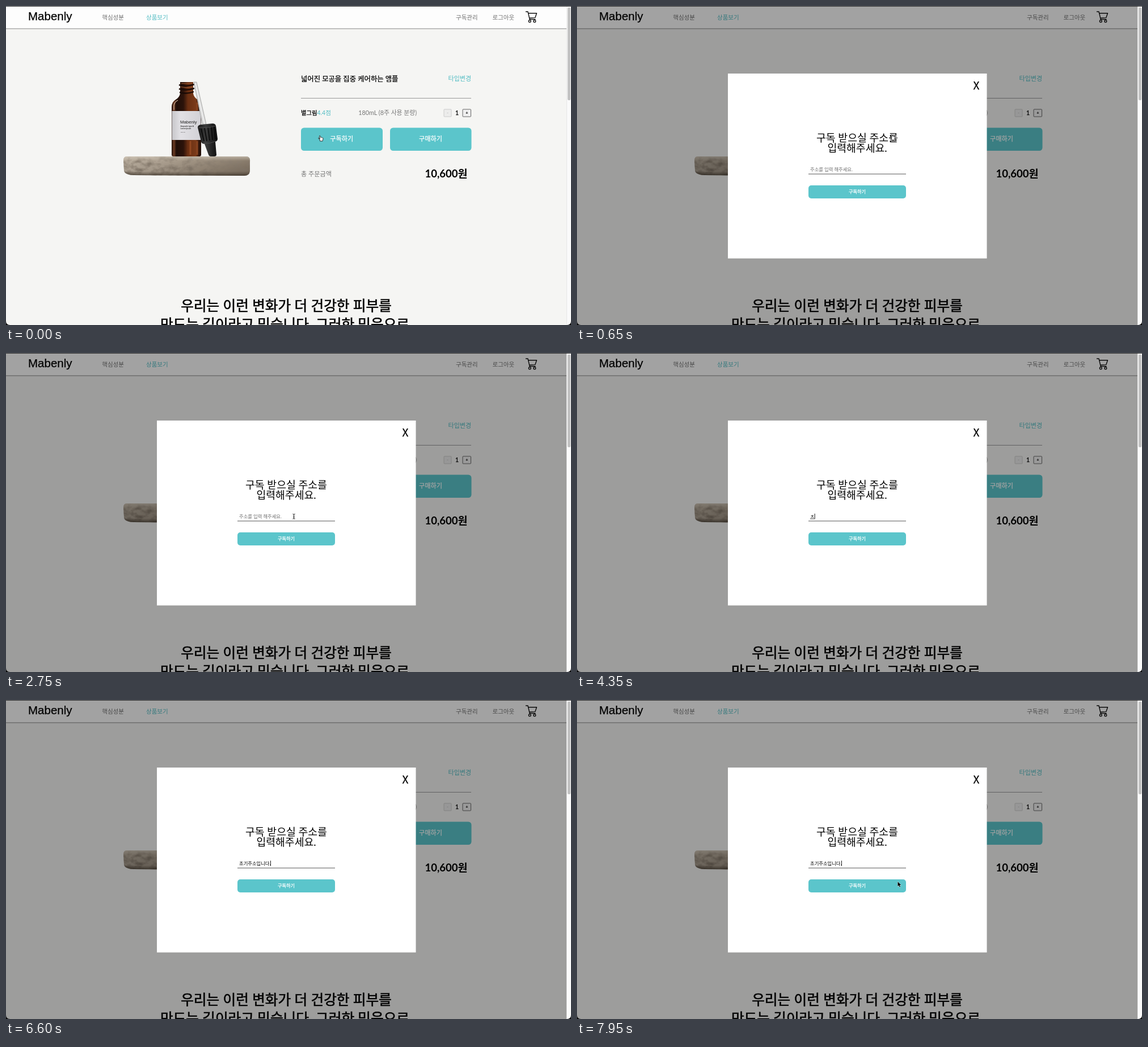
An HTML page for the animation above (8000 ms loop, 996x562 px).

```html
<!DOCTYPE html>
<html lang="ko">
<head>
<meta charset="utf-8">
<title>구독하기</title>
<style>
  html, body { margin: 0; width: 100%; height: 100%; overflow: hidden; background: #f5f5f3; }
  svg { display: block; width: 100vw; height: 100vh; }
  text { font-family: Lato, "Noto Sans CJK KR", "Noto Sans CJK", sans-serif; white-space: pre; }
  .logo { font-family: "Liberation Sans", Arial, sans-serif; }
  .close { font: 19px "Noto Sans CJK KR", "Noto Sans CJK", sans-serif; }
  .mid { text-anchor: middle; }
  .end { text-anchor: end; }
  .medium { stroke: currentColor; stroke-width: .25px; }
  .nav { font-size: 10.5px; fill: #707070; }
  .teal { fill: #51bcc3; }
  .white { fill: #fff; color: #fff; }
  .grey { fill: #777; }
  .headline { font-size: 24.65px; stroke: #000; stroke-width: .6px; }
  .title { font-size: 18.3px; }
  .field { font-size: 8.3px; }
</style>
</head>
<body>
<svg viewBox="0 0 996 562" preserveAspectRatio="none">
  <defs>
    <linearGradient id="glass">
      <stop offset="0" stop-color="#24120b"/><stop offset=".08" stop-color="#6b3a22"/>
      <stop offset=".16" stop-color="#1f0e08"/><stop offset=".4" stop-color="#2c130a"/>
      <stop offset=".55" stop-color="#6a2f12"/><stop offset=".82" stop-color="#7a3a19"/>
      <stop offset=".92" stop-color="#32160b"/><stop offset="1" stop-color="#1f0e08"/>
    </linearGradient>
    <linearGradient id="label">
      <stop offset="0" stop-color="#c6c5c9"/><stop offset=".3" stop-color="#e2e1e5"/>
      <stop offset="1" stop-color="#d2d1d6"/>
    </linearGradient>
    <linearGradient id="cap">
      <stop offset="0" stop-color="#171717"/><stop offset=".4" stop-color="#3b3b3b"/>
      <stop offset="1" stop-color="#0d0d0d"/>
    </linearGradient>
    <linearGradient id="stone">
      <stop offset="0" stop-color="#b5aa9b"/><stop offset=".25" stop-color="#ab9f90"/>
      <stop offset=".6" stop-color="#958878"/><stop offset="1" stop-color="#7c6f60"/>
    </linearGradient>
    <linearGradient id="stoneShade" x2="0" y2="1">
      <stop offset="0" stop-color="#e0d8ca" stop-opacity=".7"/><stop offset=".25" stop-color="#c8bba8" stop-opacity=".15"/>
      <stop offset=".75" stop-color="#4c4135" stop-opacity=".1"/><stop offset="1" stop-color="#2b231a" stop-opacity=".8"/>
    </linearGradient>
    <filter id="grain" x="0" y="0" width="1" height="1">
      <feTurbulence type="fractalNoise" baseFrequency=".07 .11" numOctaves="4" seed="4"/>
      <feColorMatrix values="0 0 0 0 .22  0 0 0 0 .18  0 0 0 0 .14  2.6 0 0 0 -1.05"/>
    </filter>
    <clipPath id="stoneClip"><path d="M213 265H424Q431 266 430 274V291Q429 299 420 299L225 298Q209 297 208 290L207 272Q207 265 213 265Z"/></clipPath>
  </defs>

  <rect width="996" height="562" fill="#f5f5f3"/>
  <rect width="988" height="40" fill="#fdfdfd"/>
  <path d="M0 40H988" stroke="#858585"/>

  <text class="logo" x="39" y="25.3" font-size="20.5" stroke="#000" stroke-width=".25">Mabenly</text>
  <text class="nav" x="169.3" y="23.7">핵심성분</text>
  <text class="nav teal" x="247" y="23.7">상품보기</text>
  <text class="nav" x="793" y="23.7">구독관리</text>
  <text class="nav" x="857.5" y="23.7">로그아웃</text>
  <g fill="none" stroke="#111" stroke-width="1.4" stroke-linejoin="round" stroke-linecap="round">
    <path d="M916.5 10H920L923.2 23.5H933M920.8 12.8H935.5L932.8 20.6L922.6 21.2"/>
    <circle cx="923.3" cy="26.7" r="1.9"/><circle cx="931.8" cy="26.7" r="1.9"/>
  </g>

  <g id="bottle">
    <path d="M307 134H330V154Q331 161 338 165Q344 169 344 178V262Q344 265 341 265H295Q292 265 292 262V178Q292 169 299 165Q306 161 307 154Z" fill="url(#glass)"/>
    <path d="M305 139Q318 143 332 138M305 146Q318 150 332 145M306 152Q318 156 331 151" fill="none" stroke="#1b0b06" stroke-width="2.4"/>
    <path d="M309 136.5H328M308 142.5Q318 145 329 142.5" fill="none" stroke="#a2623b" stroke-width=".9"/>
    <path d="M296 183V175Q297 169 303 166" fill="none" stroke="#d9b9a0" stroke-width="1.2"/>
    <path d="M325 238V262M337 170V184M337 238V262" stroke="#a9562a" stroke-width="3" opacity=".6"/>
    <rect x="292.5" y="185" width="51" height="51" fill="url(#label)"/>
    <text class="logo" x="307" y="207" font-size="7.8" fill="#222">Mabenly</text>
    <g font-size="3.3" fill="#333">
      <text x="307.5" y="213.3" font-weight="700">Ampoule type A</text>
      <text x="307.5" y="217.3" font-weight="700">Lorem ipsum</text>
      <text x="307.5" y="222.8" font-size="2.6">180 mL</text>
    </g>
    <path d="M331 134H336L353 208H346Z" fill="#d9d9d8" stroke="#9b9b9a" stroke-width=".7"/>
    <path d="M334 136L350 208" stroke="#f8f8f8" stroke-width="1.2"/>
    <path d="M338 214Q338 210 343 209L364 207Q369 207 370 211L373 234Q373 238 369 239L371 262Q371 265 367 265H361Q358 265 357 262L350 243Q345 243 344 239Z" fill="url(#cap)"/>
    <path d="M344 216L349 238M350 215L354 238M356 214L359 237M362 213L364 236M367 213L369 235" stroke="#080808" stroke-width="1.6"/>
    <path d="M339 214Q355 216 370 211M348 242Q360 243 370 238" fill="none" stroke="#555" stroke-width=".8"/>
  </g>
  <g clip-path="url(#stoneClip)">
    <rect x="207" y="264" width="224" height="36" fill="url(#stone)"/>
    <rect x="207" y="264" width="224" height="36" filter="url(#grain)"/>
    <rect x="207" y="264" width="224" height="36" fill="url(#stoneShade)"/>
  </g>

  <text class="medium" x="520" y="132.9" font-size="12.33">넓어진 모공을 집중 케어하는 앰플</text>
  <text class="teal end" x="820" y="132" font-size="11">타입변경</text>
  <path d="M520 162.5H820" stroke="#999"/>
  <text class="medium" x="520" y="191.6" font-size="10.35">별그림</text>
  <text class="teal" x="548.5" y="191.6" font-size="10.5">4.4점</text>
  <text class="grey" x="621.3" y="191.6" font-size="10.8">180mL (8주 사용 분량)</text>
  <rect x="772" y="182" width="13" height="13" rx="1" fill="#ececeb" stroke="#cbcbcb"/>
  <text class="mid" x="778.5" y="191.3" font-size="8" fill="#aaa">-</text>
  <text class="mid medium" x="795" y="192" font-size="10.5">1</text>
  <rect x="805" y="182" width="14.5" height="13" rx="1" fill="#efefef" stroke="#666"/>
  <text class="mid" x="812.3" y="191.3" font-size="8" font-weight="700">+</text>
  <g fill="#5bc5cb">
    <rect x="520" y="214.5" width="144" height="40.5" rx="5.5"/>
    <rect x="677" y="214.5" width="143.5" height="40.5" rx="5.5"/>
  </g>
  <text class="mid white medium" x="591.7" y="238.2" font-size="11.1">구독하기</text>
  <text class="mid white medium" x="748.5" y="238.2" font-size="11.1">구매하기</text>
  <text class="grey" x="520" y="300" font-size="11.1">총 주문금액</text>
  <text class="end" x="813.5" y="302.2" font-size="18.5" font-weight="700">10,600원</text>

  <text class="headline mid" x="494" y="536.8">우리는 이런 변화가 더 건강한 피부를</text>
  <text class="headline mid" x="491.5" y="569.5">만드는 길이라고 믿습니다. 그러한 믿음으로</text>

  <g id="modal">
    <rect y="1" width="988" height="561" opacity=".36"/>
    <rect x="266" y="119" width="456.5" height="325.7" fill="#fff"/>
    <text class="close mid medium" x="704" y="146.5">X</text>
    <text class="title mid" x="494" y="238.6">구독 받으실 주소를</text>
    <text class="title mid" x="494" y="256.8">입력해주세요.</text>
    <text class="field" id="placeholder" x="411" y="290.9" fill="#6f6f6f">주소를 입력 해주세요.</text>
    <text class="field" id="typed" x="411" y="290.6"></text>
    <path id="composing" stroke="#000" stroke-width=".8"/>
    <path id="caret" stroke="#000" stroke-width=".9"/>
    <path d="M408 296H580" stroke="#555"/>
    <rect x="408" y="316" width="172" height="23" rx="5" fill="#5bc5cb"/>
    <text class="mid white medium" x="494" y="330.1" font-size="8.2">구독하기</text>
  </g>

  <rect x="988" width="8" height="562" fill="#fafafa"/>
  <path d="M988.5 0V562" stroke="#e6e6e6"/>
  <rect x="990" y="2.5" width="5.2" height="163.5" rx="2.6" fill="#c2c2c2"/>
  <path d="M0 .5H996" stroke="#333"/>
  <path d="M0 555Q0 562 7 562H0ZM996 555Q996 562 989 562H996Z"/>

  <g id="hand"><path d="M-1.6 1.2L-2.6-3.6Q-2.5-5-1.4-4.5L-.3-1.4Q.8-2.2 1.4-1.2Q2.5-1.8 2.9-.7Q4.1-.8 4 .7L3.4 3.4L3 5H-1.4Q-2-.1-4 .6Q-4.8-.6-3.6-.8Z" fill="#fff" stroke="#222" stroke-width=".9" stroke-linejoin="round"/></g>
  <g id="beam"><path d="M-2-4.3Q0-4.3 0-3.4Q0-4.3 2-4.3M0-3.4V3.4M-2 4.3Q0 4.3 0 3.4Q0 4.3 2 4.3M-1 .9H1" fill="none" stroke="#111"/></g>
  <g id="arrow"><path d="M0 0V8L1.9 6.3L3.1 9.2L4.5 8.6L3.3 5.8H5.7Z" stroke="#fff" stroke-width=".8" paint-order="stroke"/></g>
</svg>
<script>
const $ = id => document.getElementById(id);
const LOOP = 8000, FIELD_X = 411, ADVANCE = 8.3 * .92;

// Hangul syllables as the input method composes them.
const typing = [
  [4350, 'ㅊ'], [4650, '초'], [4950, '촉'], [5100, '초기'], [5200, '초깆'], [5300, '초기주'],
  [5500, '초기주소'], [5600, '초기주송'], [5700, '초기주소이'], [5750, '초기주소입'],
  [5900, '초기주소입ㄴ'], [6000, '초기주소입니'], [6050, '초기주소입닏'],
  [6150, '초기주소입니다'], [6600, '초기주소입니다.']
];

// Pointer path: time, x, y.
const path = [
  [0, 555, 233], [50, 555, 233], [250, 557.5, 235], [350, 557.5, 235], [500, 557, 236],
  [600, 557, 236], [650, 556.5, 231], [900, 556.5, 231], [950, 557, 241], [1250, 557, 241],
  [1650, 507.5, 288], [6900, 507.5, 288], [7100, 828, 394], [7250, 629.7, 375.5],
  [7500, 600, 350], [7750, 572, 326], [7950, 565.5, 320.3], [8000, 565.5, 320.3]
];

function pointerAt(t) {
  const i = path.findIndex(([end]) => end > t);
  const [t0, x0, y0] = path[i - 1], [t1, x1, y1] = path[i];
  const k = (t - t0) / (t1 - t0), e = k * k * (3 - 2 * k);
  return [x0 + (x1 - x0) * e, y0 + (y1 - y0) * e];
}

function pointerKind(t) {
  if (t < 950) return 'hand';
  if (t < 4200) return 'beam';
  return t < 6950 ? '' : 'arrow';
}

function caretVisible(t) {
  if (t < 4350) return t >= 1650 && (t - 1650) % 1000 < (t < 2000 ? 150 : 80);
  return t < 7100 || t >= 7600;
}

const show = (el, on) => el.style.display = on ? '' : 'none';

function draw(t) {
  show($('modal'), t >= 650);

  const text = typing.reduce((current, [at, value]) => t >= at ? value : current, '');
  const finished = text.endsWith('.');
  const right = FIELD_X + text.replace('.', '').length * ADVANCE;
  $('typed').textContent = text;
  show($('placeholder'), !text);
  show($('composing'), text && !finished);
  $('composing').setAttribute('d', `M${right - ADVANCE} 292H${right}`);
  show($('caret'), caretVisible(t));
  $('caret').setAttribute('d', `M${right + (finished ? 2 : .5)} 283V292.5`);

  const [x, y] = pointerAt(t), kind = pointerKind(t);
  for (const id of ['hand', 'beam', 'arrow']) {
    show($(id), id === kind);
    $(id).setAttribute('transform', `translate(${x} ${y})`);
  }
}

function tick() {
  draw(performance.now() % LOOP);
  requestAnimationFrame(tick);
}

tick();
</script>
</body>
</html>
```
